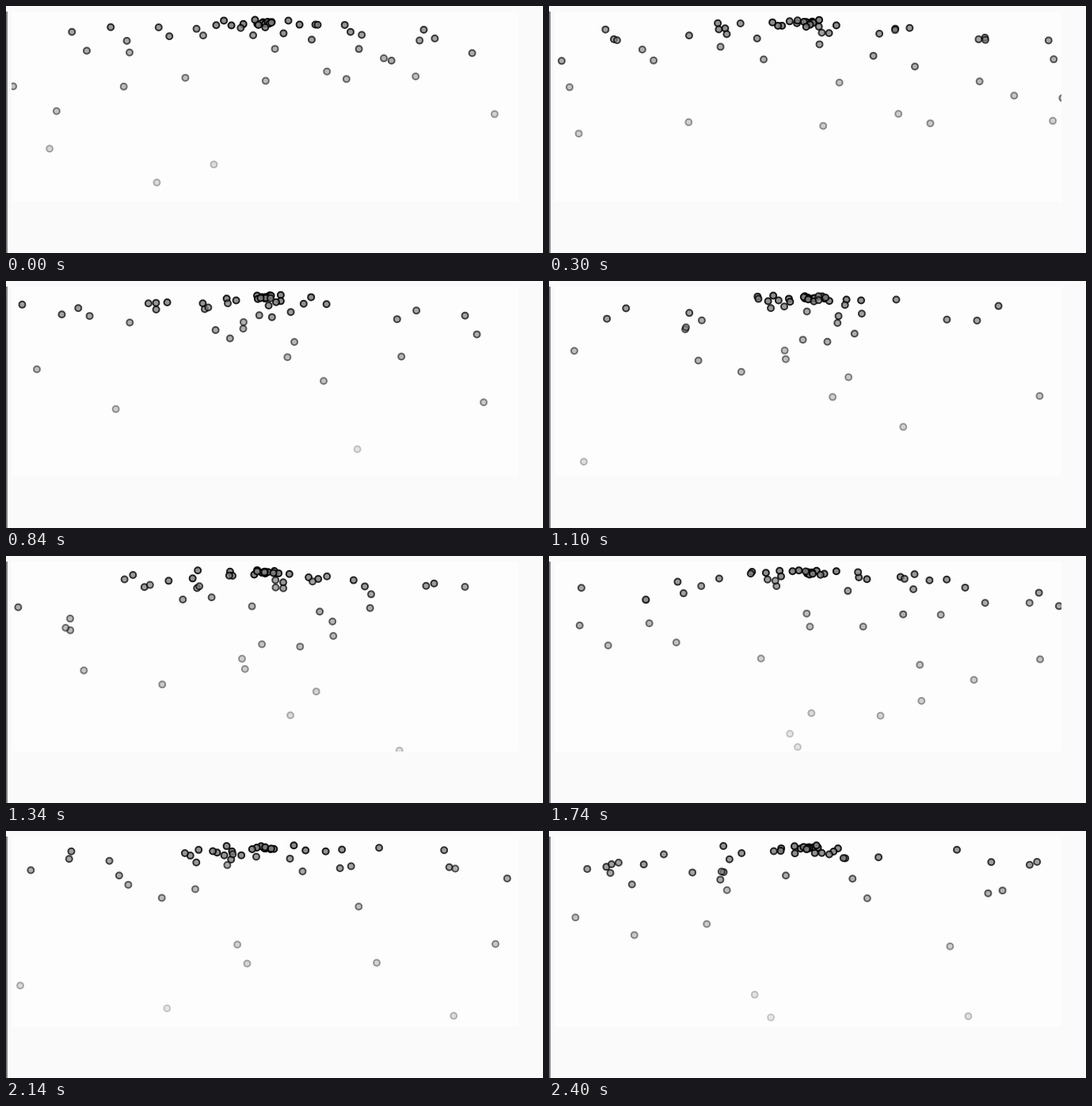
Write an HTML page with a canvas that moves like this. It is 678 px wide and 312 px high and loops after 2.43 s.

```html
<!DOCTYPE html>
<html lang="en">
<head>
<meta charset="utf-8">
<title>Particle fountain</title>
<style>
  html, body { margin: 0; width: 100%; height: 100%; overflow: hidden; background: #fafafa; }
  canvas { display: block; }
</style>
</head>
<body>
<canvas id="stage" width="678" height="312"></canvas>
<script>
const ctx = document.getElementById('stage').getContext('2d');
const LOOP = 2430;
const PANEL = [7, 7, 640, 240];
const ORIGIN = { x: 327, y: 22 };
const GRAVITY = 0.05;
const LIFESPAN = 127.5;
const LAST_TICK = 144;

let seed = 71;
const random = (lo, hi) => {
  seed = (seed * 16807) % 2147483647;
  return lo + (hi - lo) * seed / 2147483647;
};

// One particle is born per tick; early births fill the panel before the loop starts
const particles = [];
for (let birth = LAST_TICK; birth > -LIFESPAN; birth--) {
  particles.push({
    birth,
    vx: random(-1, 1),
    vy: random(-0.7, 0),
    ax: random(-0.6, 0.6)
  });
}

const travel = (v, a, t) => v * t + a * t * t / 2;

function drawParticle({ birth, vx, vy, ax }, tick) {
  const age = tick - birth;
  if (age < 0 || age >= LIFESPAN) return;
  ctx.globalAlpha = 1 - age / LIFESPAN;
  ctx.beginPath();
  ctx.arc(ORIGIN.x + travel(vx, ax, age), ORIGIN.y + travel(vy, GRAVITY, age), 4, 0, 2 * Math.PI);
  ctx.fill();
  ctx.stroke();
}

function draw(ms) {
  // 30 pictures a second on a 10 ms clock, two ticks each
  const tick = 2 * Math.floor(Math.floor(ms / 10) * 3 / 10);
  ctx.fillStyle = '#fafafa';
  ctx.fillRect(0, 0, 678, 312);
  ctx.fillStyle = '#fdfdfd';
  ctx.fillRect(...PANEL);
  ctx.fillStyle = '#808080';
  ctx.fillRect(0, 7, 2, 305);

  ctx.save();
  ctx.beginPath();
  ctx.rect(...PANEL);
  ctx.clip();
  ctx.fillStyle = '#7f7f7f';
  ctx.strokeStyle = '#000';
  ctx.lineWidth = 2;
  particles.forEach(p => drawParticle(p, tick));
  ctx.restore();
}

const start = performance.now();
function loop() {
  draw((performance.now() - start) % LOOP);
  requestAnimationFrame(loop);
}
loop();
</script>
</body>
</html>
```
